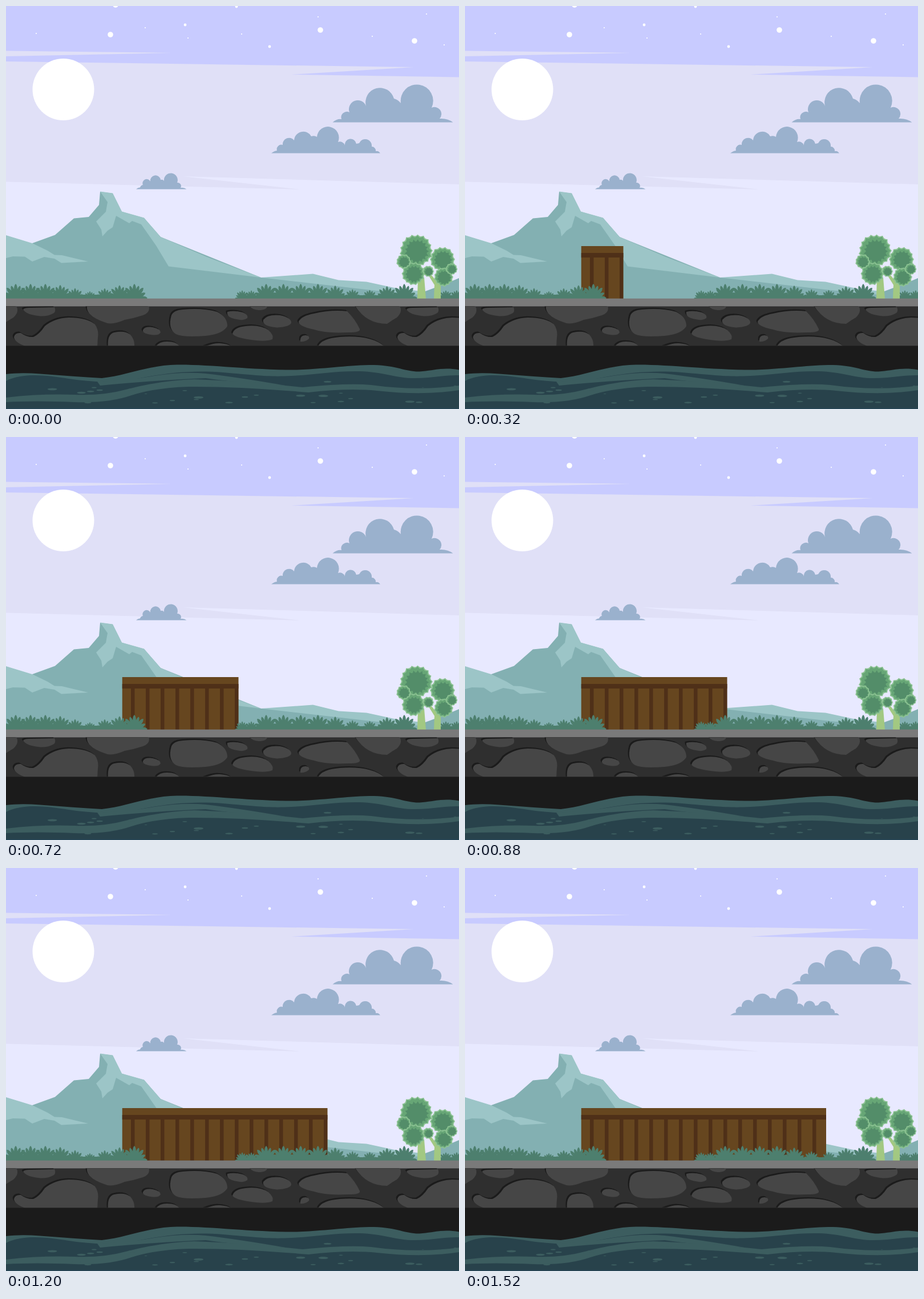
Write an HTML page that moves like this. It is 794x705 px and loops after 1.6 s.

```html
<!DOCTYPE html>
<html lang="en">
<head>
<meta charset="utf-8">
<title>Fence at dusk</title>
<style>
html, body { margin: 0; width: 100%; height: 100%; overflow: hidden; background: #e8e9ff; }
svg { display: block; width: 794px; height: 705px; }
</style>
</head>
<body>
<svg viewBox="0 0 794 705">
  <defs>
    <clipPath id="reveal"><rect id="mask" x="203.5" y="419" width="0" height="94"/></clipPath>
    <clipPath id="band"><rect y="525.5" width="794" height="69"/></clipPath>
    <path id="corner" d="M-60 525H18Q24 535 13 545Q4 550 -4 556Q-40 556 -60 525zM30 531Q32 528 40 528L85 527Q88 533 84 537Q75 543 60 542.5Q35 540 30 531zM14 579Q16 571 26 572Q37 580 48 579Q58 575 68 560Q85 546 110 545Q142 545 156 557Q163 567 161 580L160 596H36Q14 588 14 579z"/>
    <g id="stones">
      <use href="#corner"/>
      <use href="#corner" x="672"/>
      <path d="M142 524H250Q254 536 240 541Q225 546 208 549Q190 557 178 555Q155 548 146 538Q141 532 142 524z"/>
      <path d="M179 596Q177 574 190 571Q208 567 218 575Q226 584 225 596zM263 596Q268 587 282 587Q300 587 304 596zM347 596Q365 589 375 590Q390 591 396 596zM547 596Q552 582 585 579Q640 575 664 596z"/>
      <path d="M240 567Q243 560 257 562Q271 565 271 571Q268 577 254 575Q239 573 240 567zM516 583Q517 576 525 576Q533 577 531 582Q525 588 516 587z"/>
      <path d="M290 541Q294 532 310 531Q345 528 370 535Q388 544 388 560Q380 574 350 577Q310 580 298 574Q283 565 290 541z"/>
      <path d="M388 535Q400 532 415 536Q425 540 423 546Q416 551 404 548Q386 545 388 535zM427 524H458Q458 532 443 532Q430 531 427 524z"/>
      <path d="M397 573Q400 562 420 560Q445 557 460 567Q470 576 467 583Q455 588 430 584Q400 580 397 573zM451 549Q458 539 480 541Q500 545 500 554Q498 561 475 562.5Q448 560 451 549z"/>
      <path d="M513 552Q518 542 540 538Q570 531 598 534Q612 548 620 565Q622 571 600 571Q560 573 540 566Q512 560 513 552z"/>
    </g>
  </defs>

  <path fill="#c8cbff" d="M0 0H794V126H0z"/>
  <path fill="#e0e0f7" d="M0 78.5L290 82L0 88zM0 97L714 107L500 120L794 124.5V312L310 298L516 321L0 307.5z"/>
  <g stroke="#fff" stroke-linecap="round">
    <path stroke-width="9.6" d="M192 -2h0M183 50h0M551 42h0M716 61h0"/>
    <path stroke-width="4.8" d="M314 33h0M404 1h0M462 71h0"/>
    <path stroke-width="2.2" d="M53 48h0M244 38h0M319 56h0M413 49h0M547 19h0M642 53h0M737 14h0M768 68h0"/>
  </g>
  <circle cx="100.5" cy="146" r="54" fill="#fff"/>

  <g fill="#9ab1cd">
    <path d="M572.5 203.5Q580 197 588 198A10 10 0 0 1 602 186A15 15 0 0 1 631 175A24.5 24.5 0 0 1 680 162Q686 163 692 170A28.5 28.5 0 1 1 746 178A12 12 0 0 1 760 197Q774 196 783.5 203.5z"/>
    <path d="M465 257.5Q471 253 475 253A8 8 0 0 1 485 243A11.2 11.2 0 0 1 505 235A16 16 0 0 1 535 228Q541 226 545 229A19.3 19.3 0 1 1 582 238A9 9 0 0 1 594 244A9.5 9.5 0 0 1 614 241L619 240A11.5 11.5 0 0 1 641 246A7 7 0 0 1 648 254Q653 253 656 257.5z"/>
    <path d="M228 320.5Q232 317 235 317.5A6 6 0 0 1 240 313A7 7 0 0 1 253 307A9.1 9.1 0 0 1 271 304Q275 303 277 306A12 12 0 1 1 300 309A6 6 0 0 1 306 318Q312 317 316.5 320.5z"/>
  </g>

  <path fill="#9cc5c7" d="M447 475L538 468.5L583 479.5L632 482.5L690 495L735 499.5L794 485V512H400z"/>
  <path fill="#83b0b2" d="M0 425L46 415L86 400.5L119 371.5L145 369L163 348L165 325L187 328L203 360L242 371L271 404L447 475L640 497L735 506V499L770 486L794 476V512H0z"/>
  <path fill="#9cc5c7" d="M165 324.5L187 327.5L203 359.5L242 370.5L271 404L352 439L447 475L285 455.5L263 419L237 382L221 376L216 380L193 367L187 387L178 393L169 403L167 391L158 377L175 360L178 343z"/>
  <path fill="#9cc5c7" d="M0 401L46 415L73 428L85 435.5L98 436L144 447L97 449.5L85 442L67 439L46 447L33 438.5L12 438L0 441z"/>

  <g clip-path="url(#reveal)">
    <path fill="#66461f" d="M203.5 420H633V512H203.5z"/>
    <path id="slats" fill="#4f3018"/>
  </g>

  <g id="bushes" fill="#4d7f6e"><path d="M0 505H236L243 512H0zM404 512L410 506H710L716 512zM762 512L768 506H794V512z"/></g>
  <path fill="#a2c882" d="M721 512L722 475H733L736 512zM750 512L751 488L741 472L745 470L755 482L762 480V512z"/>
  <g id="leaves"></g>

  <rect y="511.7" width="794" height="14" fill="#7a7a7a"/>
  <rect y="525.3" width="794" height="70" fill="#2f2f2f"/>
  <g clip-path="url(#band)">
    <use href="#stones" x="-2.3" y="-2.3" fill="#1b1b1b"/>
    <use href="#stones" fill="#464646"/>
  </g>
  <rect y="594.5" width="794" height="111" fill="#1b1b1b"/>

  <path fill="#3c5d5f" d="M0 644Q25 641 60 643.5Q120 648 168 651C210 647 250 628 300 627.5C360 627 430 637 510 636.5C570 634 600 628 645 628C685 629 700 640 725 639.5C750 638 765 631 794 636.5V705H0z"/>
  <path fill="#28424b" d="M0 656C30 641 70 646 110 652S190 660 230 652S320 636 380 641S460 649 500 647S580 638 620 639S680 650 710 651S770 645 794 646V705H0z"/>
  <path fill="#3c5d5f" d="M160 657Q215 655 260 647Q310 639 350 643Q410 650 490 664Q410 660 350 651Q270 654 165 664z"/>
  <path fill="#3c5d5f" d="M0 685Q60 678 120 680Q170 682 210 671Q270 655 330 653Q420 656 520 667Q600 659 640 663Q720 674 794 664V672Q730 682 650 673Q600 668 530 676Q400 665 320 666Q260 668 220 681Q180 695 120 693Q50 690 0 693z"/>
  <g id="ripples" fill="#3c5d5f"></g>
  <rect y="703" width="794" height="2" fill="#264453"/>
</svg>
<script>
const $ = id => document.getElementById(id);
function add(id, tag, attrs) {
  const el = document.createElementNS('http://www.w3.org/2000/svg', tag);
  for (const k in attrs) el.setAttribute(k, attrs[k]);
  $(id).appendChild(el);
}
let seed = 7;
const random = () => (seed = seed * 16807 % 2147483647) / 2147483647;

// A fan of pointed leaves
function bush(x, h) {
  let d = '';
  for (let i = -4; i <= 4; i++) {
    const len = h * (i % 2 ? 0.93 : 1);
    const at = (r, turn) => {
      const a = i * 0.38 + turn;
      return `${x + Math.sin(a) * r * 0.88} ${512 - Math.cos(a) * r}`;
    };
    d += `M${x} 512Q${at(len * 0.85, -0.3)} ${at(len, 0)}Q${at(len * 0.85, 0.3)} ${x} 512z`;
  }
  add('bushes', 'path', { d });
}
// Bushes are lowest around x = low and grow to both sides
function bushRow(from, to, count, low) {
  for (let i = 0; i < count; i++) {
    const x = from + (to - from) * i / (count - 1);
    bush(x, 13 + 10 * Math.min(1.3, Math.abs(x - low) / 48));
  }
}
bushRow(17, 225, 9, 148);
bushRow(414, 430, 2, 422);
bushRow(456, 698, 9, 625);
bushRow(771, 790, 2, 780);

// Tree crowns: jagged discs stacked light to dark
function disc(x, y, r, n, depth, fill) {
  const points = Array.from({ length: n * 4 }, (_, i) => {
    const a = i * Math.PI / (n * 2);
    const q = r * (1 - depth * Math.abs(Math.sin(a * n / 2)) + 0.02 * Math.sin(a * 5));
    return `${x + Math.cos(a) * q},${y + Math.sin(a) * q}`;
  });
  add('leaves', 'polygon', { points: points.join(' '), fill });
}
function crown(x, y, r) {
  const n = Math.round(7 + r / 3);
  disc(x, y, r, n, 0.1, '#8cc293');
  disc(x, y, r - 2, n, 0.12, '#67a676');
  disc(x + 1, y + 1, r * 0.74, n, 0.2, '#538d69');
}
crown(719, 428, 29);
crown(714, 468, 20.5);
crown(765, 443, 22);
crown(767, 474, 17);
crown(697, 447, 13);
crown(740, 464, 10);
crown(781, 460, 10.5);

for (let i = 0; i < 34; i++) {
  const rx = 2 + random() * 7;
  add('ripples', 'ellipse', { cx: 40 + random() * 750, cy: 655 + random() * 42, rx, ry: rx * 0.23 });
}

// Fence: one slat more per step, half a slat at either end
const LOOP = 1600, STEP = 80, PITCH = 26;
let slats = 'M203.5 432H633V440H203.5z';
for (let x = 219; x < 613; x += PITCH) slats += `M${x} 440h6.5v72h-6.5z`;
$('slats').setAttribute('d', slats);

const keys = [[0, 0], [2, 22], [17, 412], [19, 429.5]];
function width(step) {
  const i = Math.max(1, keys.findIndex(([s]) => s >= step));
  const [s0, w0] = keys[i - 1], [s1, w1] = keys[i];
  return w0 + (w1 - w0) * (step - s0) / (s1 - s0);
}
function draw() {
  $('mask').setAttribute('width', width(Math.floor(performance.now() % LOOP / STEP)));
  requestAnimationFrame(draw);
}
draw();
</script>
</body>
</html>
```
